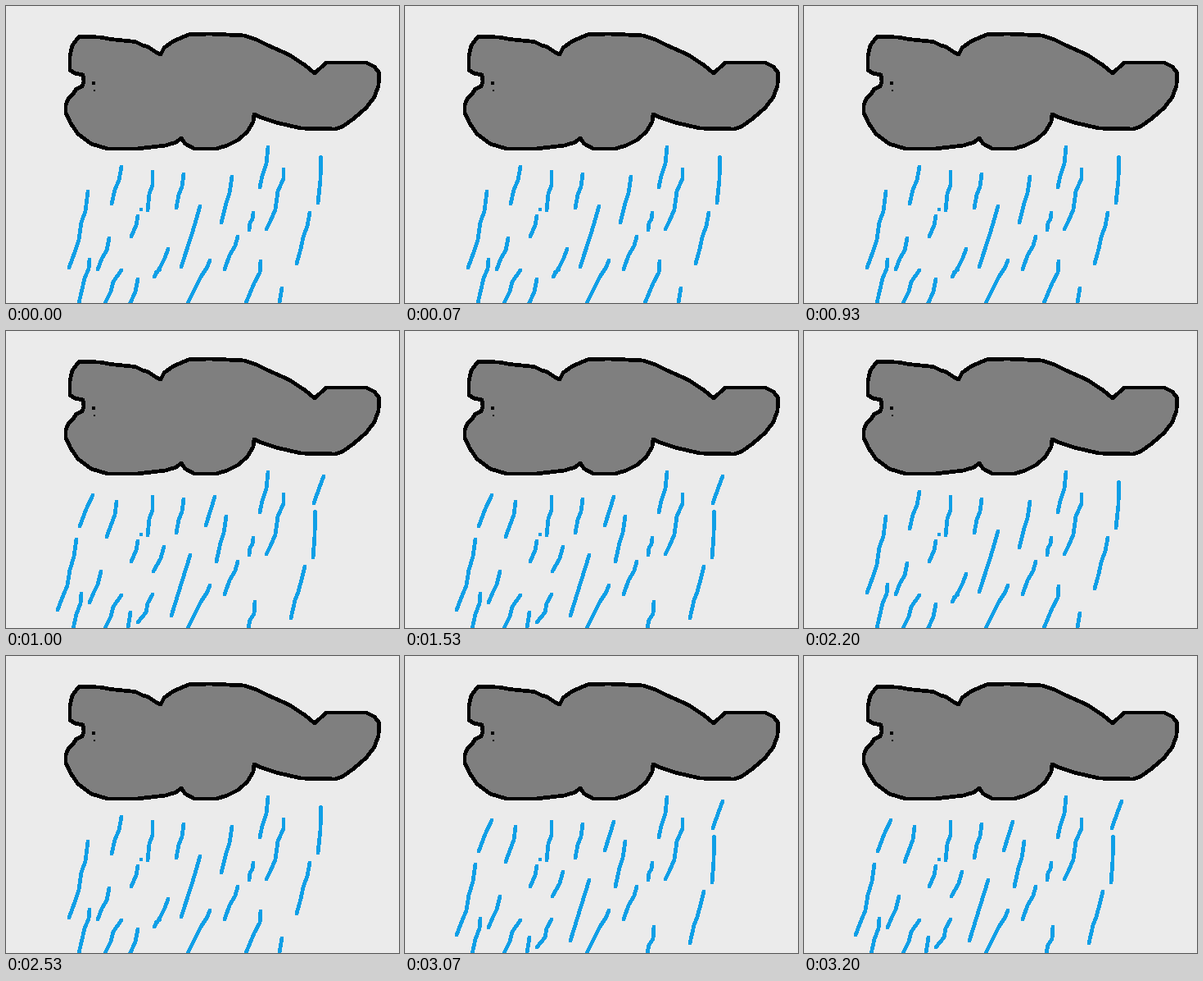
Recreate the animation shown at these times as an HTML page. Size 480 by 362 pixels, loop 4070 ms.

```html
<!DOCTYPE html>
<html lang="en">
<head>
<meta charset="utf-8">
<title>Rain cloud</title>
<style>
html, body { margin: 0; width: 100%; height: 100%; overflow: hidden; background: #ebebeb; }
svg { display: block; shape-rendering: crispEdges; }
path { stroke-linecap: round; stroke-linejoin: round; stroke-width: 4.8; }
.rain { fill: none; stroke: #0f9fe6; }
</style>
</head>
<body>
<svg width="480" height="362" viewBox="0 0 480 362">
  <path fill="#7f7f7f" stroke="#000" d="M89 37.5L115 38 128 40.5 158 43.5 167 48 174 50 184 57 189 59 193 51
    204 43 224 34.5 250 34 291 36 306 41 320 48 345 59 365 72 377 82 391 69 440 69 450 74 455.5 81 455 97
    450 111 440 124 425 137 411 147 402 150 360 149 330 142 312 136 303 132 302 141 295 153 284 163
    270 170 257 174 230 174 219 168 214 161 208 166 195 170 160 174 124 174 104 168 88 156 79 143
    73 130 73 121 76 113 82 107 86 101 93 98 95 92 94 84 84 82 78 78 78 61 81 48Z"/>
  <circle cx="107" cy="94" r="2.4"/>
  <circle cx="108" cy="103" r="1"/>
  <path class="rain" d="M179 202L179 218 175 229 173 249M217 205L215 220 211 230 208 246
    M320 172L318 192 313 207 310 221M339 199L339 210 332 226 329 248 323 262 318 272
    M302 252L301 260 298 264 297 273M283 281L280 292 273 304 267 321
    M161 256L159 267 153 281M165 248h.1M249 310L246 318 238 330 222 362M141 322L131 336 128 348 121 362"/>
  <path class="rain" id="high" d="M141 196L138 212 133 224 129 241M100 226L97 250 92 264 89 285 84 300 77 319
    M126 283L123 298 117 308 112 321M102 309L101 320 96 332 89 362M161 333L158 348 151 364
    M198 296L194 307 188 319 181 330M188 321L183 325M237 244L228 275 214 318M276 208L273 228 269 240 263 264
    M384.5 184L384 212 381 240M371 252L368 268 363 282 360 296 355 314M311 311L310 325 303 338 293 362M337 344L334 362"/>
  <path class="rain" id="low" d="M106 200L98 217 90 238M135 208L133 224 128 237 123 251
    M86 254L83 275 78 291 75 310 70 322 63 340M116 293L112 309 107 319 102 331M92 320L91 332 86 345 82 363
    M152 343L149 362M179 321L173 332 171 343 161 355M193 263L189 277 180 293M225 273L215 305 202 347
    M255 202L251 215 244 237M269 226L266 246 262 258 257 281M388 177L383 190 376 210
    M377.5 220L377 250 375 276M365 287L361 303 357 318 353 328 348 350M304 330L303 345 298 352 296 362"/>
</svg>
<script>
const LOOP = 4070;
const high = document.getElementById('high');
const low = document.getElementById('low');

function draw(now) {
  const t = now % LOOP;
  const isHigh = t < 1000 || (t >= 2070 && t < 3070);
  high.style.display = isHigh ? '' : 'none';
  low.style.display = isHigh ? 'none' : '';
}

const start = performance.now();
function tick() {
  draw(performance.now() - start);
  requestAnimationFrame(tick);
}
tick();
</script>
</body>
</html>
```
